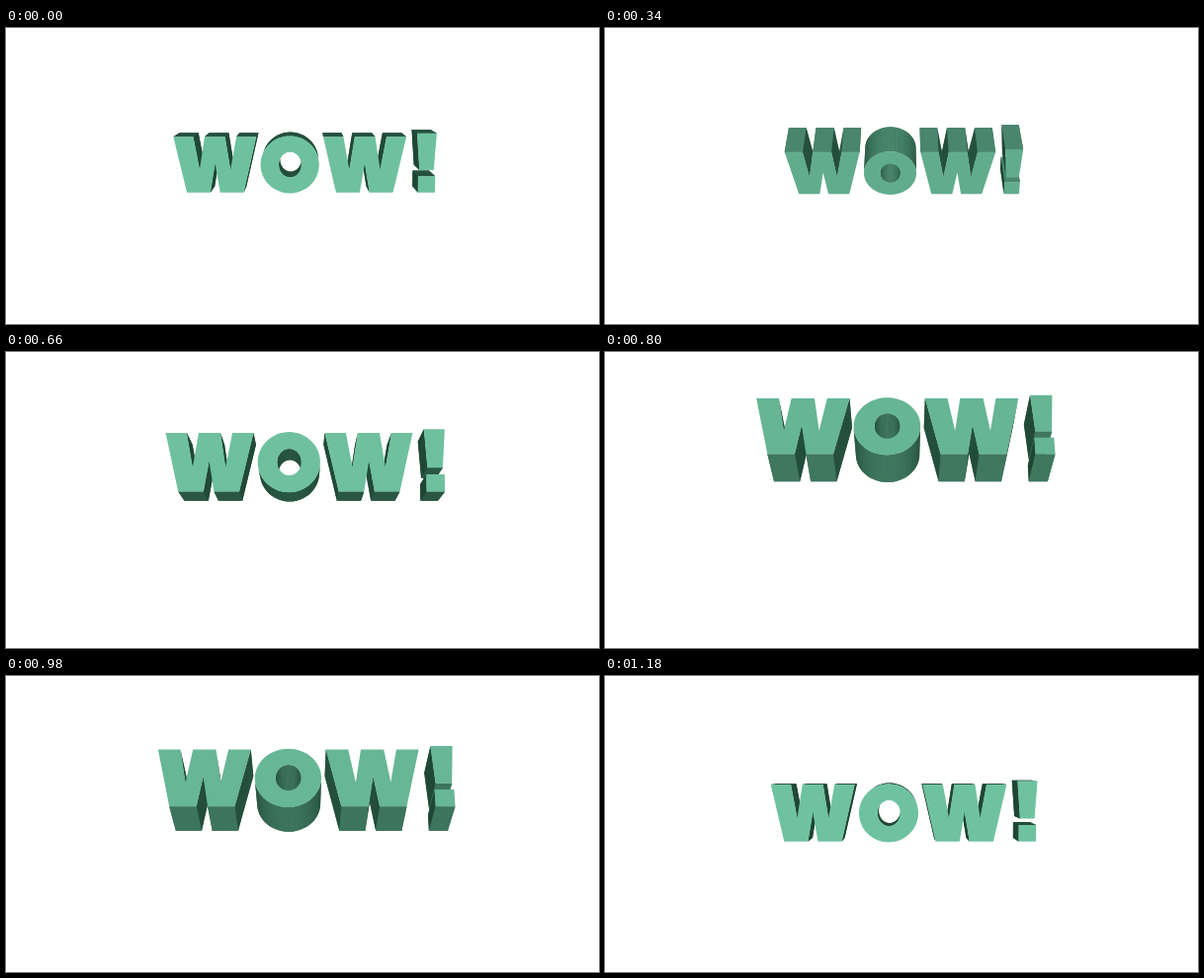
An HTML page with a canvas that plays this animation: 600 px wide and 300 px high, repeating every 1.2 s.

```html
<!DOCTYPE html>
<html lang="en">
<head>
<meta charset="utf-8">
<title>WOW!</title>
<style>
  html, body { margin: 0; width: 100%; height: 100%; overflow: hidden; background: #fff; }
  canvas { display: block; width: 600px; height: 300px; }
</style>
</head>
<body>
<canvas id="stage" width="600" height="300" role="img" aria-label="WOW!"></canvas>
<script>
const ctx = document.getElementById('stage').getContext('2d');
const LOOP = 1200, STEP = 20;
const CX = 300, CY = 150;      // vanishing point
const DEPTH = 54, LENS = 0.00093;
const CAP = 28.8;              // half the letter height
const { sin, cos, PI, abs, hypot, max } = Math;

// Outlines run clockwise on screen, holes counter-clockwise.
const letterW = cx => [
  [-42.4, -CAP], [-22, -CAP], [-15.8, 5], [-10.5, -CAP], [10.5, -CAP], [15.8, 5],
  [22, -CAP], [42.4, -CAP], [29.2, CAP], [5, CAP], [0, -1], [-5, CAP], [-29.2, CAP]
].map(([x, y]) => [x + cx, y]);

const ring = (cx, rx, ry, dir) => Array.from({ length: 64 }, (_, i) => {
  const a = dir * i * PI / 32;
  return [cx + rx * cos(a), ry * sin(a)];
});

const shapes = [
  letterW(-89.6),
  ring(-13, 30, 29.6, 1),
  ring(-12.7, 11.5, 13, -1),
  letterW(63.8),
  [[117.1, -32.3], [137.2, -32.3], [134.6, 5.6], [119.8, 5.6]],
  [[118.6, 12], [136.2, 12], [136.2, CAP], [118.6, CAP]]
];

// Colour by how far a face is turned to the viewer: 0 edge-on, 1 head-on.
function shade(facing) {
  const light = facing ** 1.1;
  const part = (full, dark) => Math.round(full * (dark + (1 - dark) * light));
  return `rgb(${part(111, 0.28)},${part(194, 0.36)},${part(160, 0.33)})`;
}

function pose(ms) {
  const a = ms / LOOP * 2 * PI;
  const swing = sin(a + 0.1);
  const dist = 1 + 0.13 * swing + 0.007 * swing * swing;
  const lift = -24.8 + 2.3 * cos(a) + 25.1 * sin(a)
    + 10.3 * cos(2 * a) - 16.6 * sin(2 * a) + 0.6 * cos(3 * a);
  return { tilt: (3.3 + 31.7 * swing) * PI / 180, scale: 1 / dist, lift };
}

function trace(points) {
  points.forEach(([x, y], i) => i ? ctx.lineTo(x, y) : ctx.moveTo(x, y));
  ctx.closePath();
}

function fill(color, outlines, rule = 'nonzero') {
  ctx.fillStyle = color;
  ctx.beginPath();
  outlines.forEach(trace);
  ctx.fill(rule);
}

function draw(ms) {
  const { tilt, scale, lift } = pose(ms);
  const st = sin(tilt), ct = cos(tilt);
  const project = ([x, y], z) => {
    const depth = z * ct - y * st;
    const f = scale / (1 - LENS * scale * depth);
    return [CX + x * f, CY + (y * ct + z * st + lift) * f];
  };

  const walls = [];
  const fronts = shapes.map(shape => {
    const front = shape.map(p => project(p, 0));
    const back = shape.map(p => project(p, -DEPTH));
    shape.forEach((p, i) => {
      const j = (i + 1) % shape.length, q = shape[j];
      const [A, B, C, D] = [front[i], front[j], back[j], back[i]];
      const turn = (B[0] - A[0]) * (C[1] - A[1]) - (B[1] - A[1]) * (C[0] - A[0]);
      if (turn >= 0) return;
      const dx = q[0] - p[0], dy = q[1] - p[1];
      walls.push({
        quad: [A, B, C, D],
        near: -(p[1] + q[1]) * st,
        facing: max(0, dx / hypot(dx, dy) * st)
      });
    });
    return front;
  });

  ctx.clearRect(0, 0, 600, 300);
  // One solid undercoat keeps the background out of the seams between walls.
  fill(shade(abs(st) * 0.7), walls.map(w => w.quad));
  walls.sort((a, b) => a.near - b.near);
  walls.forEach(w => fill(shade(w.facing), [w.quad]));
  fill(shade(ct), fronts, 'evenodd');
}

const start = performance.now();
function tick() {
  const t = (performance.now() - start) % LOOP;
  draw(Math.floor(t / STEP) * STEP);
  requestAnimationFrame(tick);
}
tick();
</script>
</body>
</html>
```
